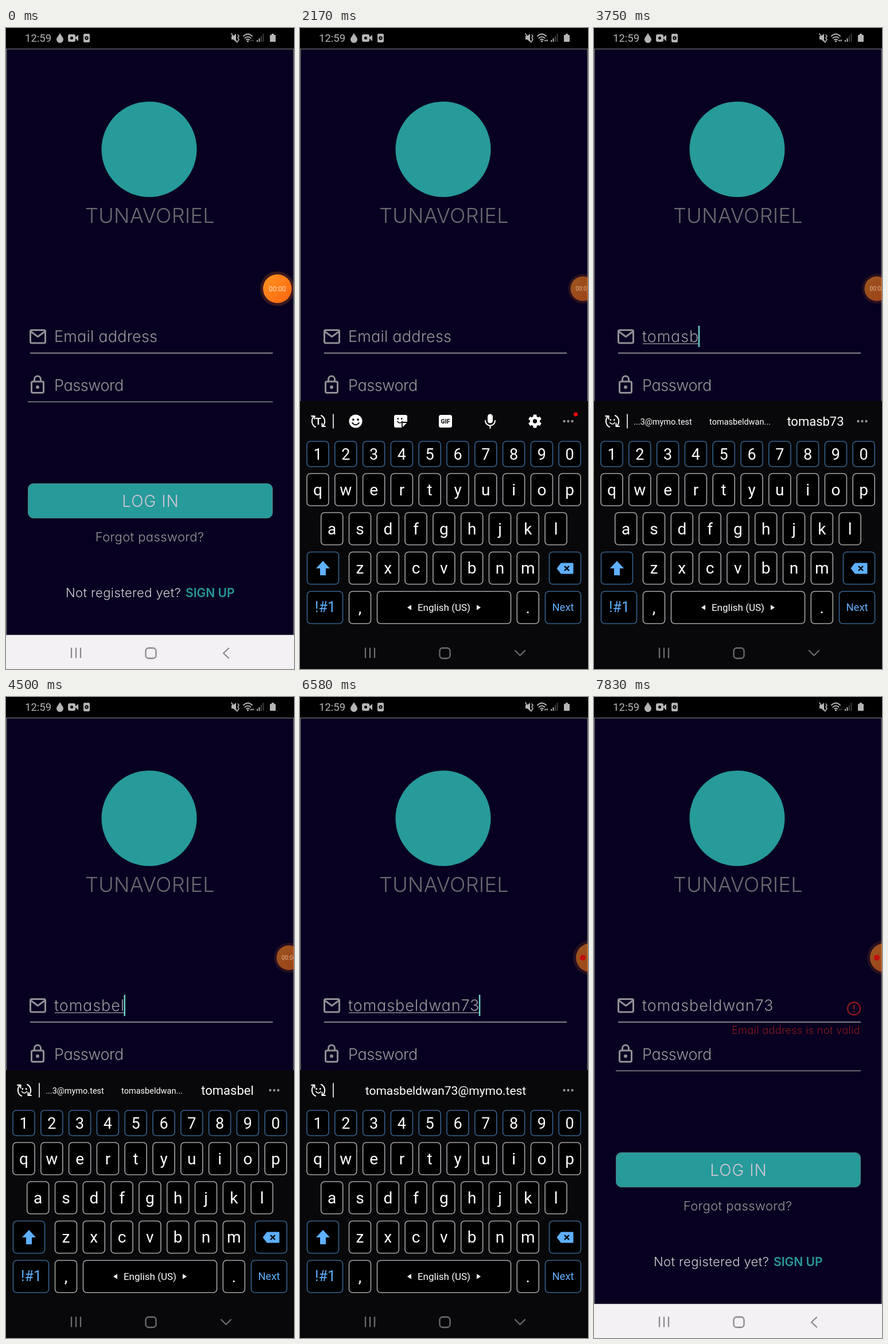
An HTML page for the animation above (8 s loop, 502 by 1115 pixels).

```html
<!DOCTYPE html>
<html lang="en">
<head>
<meta charset="utf-8">
<title>Login form</title>
<style>
html, body { margin: 0; width: 100%; height: 100%; overflow: hidden; background: #000; }
svg { display: block; width: 502px; height: 1115px; font-family: Roboto, sans-serif; }
.app { font-family: Inter, Lato, sans-serif; font-weight: 300; font-feature-settings: "cv11"; white-space: pre; }
.mid { text-anchor: middle; }
.line { fill: none; stroke-linecap: round; stroke-linejoin: round; }
</style>
</head>
<body>
<svg id="stage" viewBox="0 0 502 1115">
  <defs>
    <linearGradient id="orange" x1="0" y1="0" x2="1" y2="1">
      <stop offset="0" stop-color="#ff9420"/><stop offset="1" stop-color="#ff6410"/>
    </linearGradient>
  </defs>
  <rect width="502" height="1115" fill="#000"/>

  <!-- status bar -->
  <g fill="#b5b5b5">
    <text x="33" y="24" font-size="18.5">12:59</text>
    <path d="M94 9C97 14 100 17 100 20A6 6 0 0 1 88 20C88 17 91 14 94 9Z"/>
    <rect x="108" y="11" width="13" height="13" rx="3"/><path d="M120 17L126 12V23Z"/>
    <circle cx="114.500" cy="17.500" r="2.500" fill="#000"/>
    <rect x="135" y="10" width="11" height="15" rx="2"/>
    <circle cx="140.500" cy="17.500" r="3.200" fill="#000"/><circle cx="140.500" cy="17.500" r="1.200"/>
    <path d="M393 14H396L401 10V24L396 20H393Z"/>
    <path class="line" d="M393 10L403 25M404 12L406 14L404 17L406 20L404 23" stroke="#b5b5b5" stroke-width="1.700"/>
    <g class="line" stroke="#b5b5b5" stroke-width="2">
      <path d="M414 14Q421.500 7 429 14M416.500 17.500Q421.500 13 426.500 17.500M419 20.500Q421.500 18.500 424 20.500"/>
    </g>
    <circle cx="421.500" cy="23" r="1.600"/>
    <path id="traffic" d="M425.500 23L427.500 20L429.500 23ZM429 20.500H432.500L430.700 24Z"/>
    <path d="M437 21H439V24H437ZM440.500 18H442.500V24H440.500Z"/>
    <path d="M444 14H446V24H444ZM447.500 10H449.500V24H447.500Z" opacity=".35"/>
    <path d="M463 10H467V12H469Q470 12 470 13V23Q470 24 469 24H461Q460 24 460 23V13Q460 12 461 12H463Z"/>
  </g>

  <!-- login page -->
  <rect x=".750" y="36.500" width="500.500" height="1019.500" fill="#080020" stroke="#66646c" stroke-width="1.500"/>
  <circle cx="249.500" cy="211" r="83" fill="#279a9a"/>
  <g id="page" class="app"></g>
  <g class="line" stroke="#928f95" stroke-width="3">
    <rect x="42.500" y="525.500" width="26" height="22.500" rx="2.500"/>
    <path d="M44 528.500L55.500 537L67 528.500"/>
    <rect x="44.500" y="615" width="21" height="19.500" rx="2.500"/>
    <path d="M49.500 614V611A5.500 5.500 0 0 1 60.500 611V614"/>
  </g>
  <circle cx="55" cy="624.800" r="3" fill="#928f95"/>
  <path d="M42 565.500H465" stroke="#8a888f" stroke-width="2"/>
  <path d="M38 650.300H465" stroke="#8a888f" stroke-width="1.600"/>
  <text id="email" class="app" x="84" y="546" font-size="27" fill="#9a989d"></text>
  <rect id="under" x="85" y="548.500" height="1.500" fill="#8a888e"/>
  <rect id="caret" width="2.500" fill="#6fd0c8"/>
  <g id="error" fill="#8a181d">
    <circle cx="453" cy="542" r="11" fill="none" stroke="#8a181d" stroke-width="2.300"/>
    <path d="M451.800 536H454.200V543.500H451.800ZM451.800 546H454.200V548.500H451.800Z"/>
    <text class="app" x="464" y="586" font-size="18" letter-spacing=".4" text-anchor="end">Email address is not valid</text>
  </g>

  <!-- recorder bubble -->
  <g id="bubble">
    <circle id="halo" r="30" fill="#ff7a20" opacity=".2"/>
    <circle id="ball" r="25" fill="url(#orange)"/>
    <text id="timer" class="mid" y="4" font-size="12" fill="#ffdcb8"></text>
    <circle id="rec" cx="-13" r="5" fill="#c40d0d"/>
  </g>

  <rect y="1056" width="502" height="59" fill="#f3f1f4"/>
  <g id="board"></g>

  <!-- navigation -->
  <g id="nav" class="line" stroke-width="2.300">
    <path d="M114 1079V1095M122 1079V1095M130 1079V1095"/>
    <rect x="243.500" y="1078.500" width="18" height="18" rx="5"/>
    <path id="back"/>
  </g>
</svg>
<script>
const NS = 'http://www.w3.org/2000/svg';
const $ = id => document.getElementById(id);
const BLUE = '#5fb0ff', EDGE = '#35608f', GREY = '#a4a4a6';
const LOOP = 8000, HOLD = 90;
const NAME = 'tomasbeldwan73', MAIL = NAME + '@mymo.test';
const presses = [2500, 2750, 2920, 3170, 3340, 3580, 3920, 4170, 4670, 5000, 5170, 5420, 6000, 6330];

function add(parent, tag, attrs, text) {
  const el = document.createElementNS(NS, tag);
  for (const k in attrs) el.setAttribute(k, attrs[k]);
  if (text !== undefined) el.textContent = text;
  parent.appendChild(el);
  return el;
}
const set = (el, attrs) => { for (const k in attrs) el.setAttribute(k, attrs[k]); };
const show = (el, on) => el.setAttribute('visibility', on ? 'inherit' : 'hidden');
const ramp = (t, a, b) => Math.min(1, Math.max(0, (t - a) / (b - a)));
const mix = (a, b, p) => a + (b - a) * p;
const label = (parent, x, y, size, text, fill = '#fff', cls = 'mid') =>
  add(parent, 'text', { x, y, 'font-size': size, fill, class: cls }, text);

// Page texts
function pageText(x, y, size, text, fill, spacing, anchor = 'start', weight = 300) {
  return add($('page'), 'text', { x, y, 'font-size': size, fill, 'letter-spacing': spacing,
    'text-anchor': anchor, style: 'font-weight:' + weight }, text);
}
pageText(251, 339, 36, 'TUNAVORIEL', '#6b6970', .3, 'middle');
const hint = pageText(84, 546, 27, 'Email address', '#98969b', .2);
pageText(84, 631, 27, 'Password', '#98969b', -.4);
add($('page'), 'rect', { x: 38.5, y: 792.5, width: 426, height: 60, rx: 9, fill: '#279a9a', stroke: '#4f7c82' });
pageText(252, 833, 28, 'LOG IN', '#d0c8d4', 1, 'middle');
pageText(250.5, 893, 22, 'Forgot password?', '#98969b', .4, 'middle');
pageText(104, 990, 22, 'Not registered yet?', '#d2d0d5', .4);
pageText(313, 990, 21, 'SIGN UP', '#279a9a', 0, 'start', 600);
$('email').setAttribute('letter-spacing', .9);

// Keyboard
const board = $('board');
const keyAt = {};
add(board, 'rect', { y: 649, width: 502, height: 466, fill: '#08080a' });

function keyBox(x, y, w, h, stroke, parent = board) {
  return add(parent, 'rect', { x, y, width: w, height: h, rx: 6, fill: '#000', stroke, 'stroke-width': 1.6 });
}
function keyRow(chars, first, y, h, stroke) {
  [...chars].forEach((c, i) => {
    const x = first + i * 48.8;
    keyAt[c] = { x, y, h };
    keyBox(x - 19, y, 38, h, stroke);
    label(board, x, y + h / 2 + 9.6, h > 50 ? 28 : 27, c);
  });
}
keyRow('1234567890', 31, 719, 44, EDGE);
keyRow('qwertyuiop', 31, 775, 56, GREY);
keyRow('asdfghjkl', 55.7, 843, 56, GREY);
keyRow('zxcvbnm', 104.5, 911.5, 56, GREY);
keyRow(',', 104.5, 980, 56, GREY);
keyRow('.', 397.3, 980, 56, GREY);
keyBox(12.5, 911.5, 55, 56, EDGE);
keyBox(434.5, 911.5, 55, 56, EDGE);
keyBox(12.5, 980, 62, 56, EDGE);
keyBox(134.5, 980, 233, 56, GREY);
const next = keyBox(427.5, 980, 62, 56, EDGE);
add(board, 'path', { d: 'M40 927L52 940H45V952H35V940H28Z', fill: BLUE });
add(board, 'path', { d: 'M448 940L455 931H476V949H455Z', fill: BLUE, stroke: BLUE, 'stroke-linejoin': 'round' });
add(board, 'path', { d: 'M461 936L469 944M469 936L461 944', stroke: '#000', 'stroke-width': 2.4 });
label(board, 44, 1016, 25, '!#1', BLUE);
label(board, 458.5, 1014, 18.5, 'Next', BLUE);
label(board, 251, 1014, 17, 'English (US)');
add(board, 'path', { d: 'M194 1003.500V1012.500L187 1008ZM308 1003.500V1012.500L315 1008Z', fill: '#fff' });

// Bar above the keys
const stroke = (parent, d, width = 2, color = '#fff') =>
  add(parent, 'path', { d, class: 'line', stroke: color, 'stroke-width': width });
function face(parent, x, y, r, color) {
  for (const s of [-1, 1]) add(parent, 'circle', { cx: x + s * r * .36, cy: y - r * .25, r: r * .16, fill: color });
  const w = r * .5;
  stroke(parent, `M${x - w} ${y + r * .25}Q${x} ${y + r * .85} ${x + w} ${y + r * .25}`, r * .17, color);
}
stroke(board, 'M27 694A11.500 11.500 0 0 1 25 675M37 674A11.500 11.500 0 0 1 39 693');
stroke(board, 'M20 675H25.500V680M44 693H38.500V688');
stroke(board, 'M58 672V696', 1.6);
for (const x of [460.5, 467.5, 474.5]) add(board, 'circle', { cx: x, cy: 684, r: 2.2, fill: '#8e8e90' });

const tools = add(board, 'g', {});
label(tools, 32, 690, 16, 'T').setAttribute('font-weight', 700);
add(tools, 'circle', { cx: 97, cy: 684, r: 11.5, fill: '#fff' });
face(tools, 97, 684, 11.5, '#08080a');
add(tools, 'path', { d: 'M167 673H184Q187 673 187 676V686L178 695H167Q164 695 164 692V676Q164 673 167 673Z', fill: '#fff' });
stroke(tools, 'M187 686H180Q178 686 178 688V695', 1.8, '#08080a');
face(tools, 174, 682, 9, '#08080a');
add(tools, 'rect', { x: 242, y: 673, width: 23, height: 22, rx: 3.5, fill: '#fff' });
label(tools, 253.5, 688, 10.5, 'GIF', '#08080a').setAttribute('font-weight', 700);
add(tools, 'rect', { x: 327, y: 671.5, width: 9, height: 16, rx: 4.5, fill: '#fff' });
stroke(tools, 'M323 683A8.500 8.500 0 0 0 340 683M331.500 692V696');
for (let a = 0; a < 360; a += 60)
  add(tools, 'rect', { x: 406.5, y: 672.5, width: 6, height: 7, rx: 1, fill: '#fff', transform: `rotate(${a} 409.5 684)` });
add(tools, 'circle', { cx: 409.5, cy: 684, r: 6.2, fill: 'none', stroke: '#fff', 'stroke-width': 5 });
add(tools, 'circle', { cx: 480.5, cy: 672, r: 3.6, fill: '#f00808' });

const hints = add(board, 'g', {});
face(hints, 32, 684, 9, '#fff');
const trio = add(hints, 'g', {});
label(trio, 120, 690, 14.5, '...' + MAIL.slice(13));
label(trio, 254.5, 690, 14.5, NAME.slice(0, 12) + '...');
const third = label(trio, 386, 692, 22, '');
const whole = label(hints, 254, 692, 21, MAIL);

// Pressed key with its enlarged preview
const pressed = add(board, 'g', {});
const hot = keyBox(0, 0, 38, 56, EDGE, pressed);
set(hot, { fill: '#14263a' });
const hotText = label(pressed, 0, 0, 28, '');
const pop = add(pressed, 'rect', { width: 67, height: 81, rx: 12, fill: '#06080b', stroke: '#3b74b3', 'stroke-width': 1.8 });
const popText = label(pressed, 0, 0, 46, '', BLUE);

function drawPress(t) {
  const i = presses.findIndex(p => t >= p && t < p + HOLD);
  show(pressed, i >= 0);
  if (i < 0) return;
  const c = NAME[i], { x, y, h } = keyAt[c];
  set(hot, { x: x - 19, y, height: h });
  set(hotText, { x, y: y + h / 2 + 9.6 });
  set(pop, { x: x - 33.5, y: y - 99 });
  set(popText, { x, y: y - 41 });
  hotText.textContent = popText.textContent = c;
}

function drawHints(t) {
  const typed = presses.filter(p => t >= p + HOLD + 60).length;
  show(tools, typed === 0);
  show(hints, typed > 0);
  show(trio, typed > 0 && t < 6580);
  show(whole, typed > 0 && t >= 6580);
  const full = t >= 5830;
  third.textContent = full ? NAME.slice(0, 12) : NAME.slice(0, Math.min(typed, 9)) + (typed <= 6 ? '73' : '');
  set(third, { 'font-size': full ? 16 : 22, y: full ? 690 : 692 });
}

function drawField(t) {
  const typed = presses.filter(p => t >= p + HOLD).length;
  const email = $('email');
  email.textContent = NAME.slice(0, typed);
  show(hint, typed === 0);
  const width = typed ? email.getComputedTextLength() : 0;
  $('under').setAttribute('width', Math.max(0, width - 2));
  show($('under'), typed && t < 7170);

  const inPass = t >= 7330;
  const since = inPass ? 7330 : presses.filter(p => t >= p).pop() || 1420;
  show($('caret'), t >= 1420 && Math.floor((t - since) / 500) % 2 === 0);
  set($('caret'), inPass ? { x: 84.8, y: 602, height: 38 }
                         : { x: 84.5 + Math.max(0, width - 2), y: 518, height: 37 });
  show($('error'), t >= 7170);
}

function drawBubble(t) {
  const slide = 1 - Math.pow(1 - ramp(t, 1330, 1920), 1.4);
  const shrink = ramp(t, 1330, 1600);
  const hide = ramp(t, 5420, 5670);
  const size = mix(mix(1, .86, shrink), 1, hide);
  $('bubble').setAttribute('transform', `translate(${mix(473, 493, slide) + 13 * hide} 453.500) scale(${size})`);
  $('ball').setAttribute('opacity', mix(1, .54, shrink));
  $('halo').setAttribute('opacity', mix(.2, .13, shrink));
  $('timer').setAttribute('opacity', mix(1, .7, shrink));
  $('timer').textContent = '00:0' + Math.max(0, Math.floor((t - 420) / 1000));
  show($('timer'), hide < .5);
  show($('rec'), hide >= .5);
}

function drawNav(t, up) {
  const faint = t < 5000 ? ramp(t, 1420, 1600) : 1 - ramp(t, 7500, 7580);
  const v = up > .12 ? 110 : Math.round(mix(138, 225, faint));
  $('nav').setAttribute('stroke', `rgb(${v},${v - 2},${v + 2})`);
  $('back').setAttribute('d', t > 1500 && t < 7420 ? 'M375 1083L383.500 1091.500L392 1083' : 'M388 1079L379 1087.500L388 1096');
}

function draw(t) {
  const up = (1 - Math.pow(1 - ramp(t, 1680, 1920), 2)) * (1 - Math.pow(ramp(t, 7250, 7500), 2));
  board.setAttribute('transform', `translate(0 ${466 * (1 - up)})`);
  show(board, up > 0);
  set(next, { fill: t >= 6830 && t < 7170 ? '#14263a' : '#000' });
  $('traffic').setAttribute('opacity', t >= 750 && t < 6830 ? 1 : .35);
  drawPress(t);
  drawHints(t);
  drawField(t);
  drawBubble(t);
  drawNav(t, up);
}

function tick() {
  draw(performance.now() % LOOP);
  requestAnimationFrame(tick);
}
tick();
</script>
</body>
</html>
```
